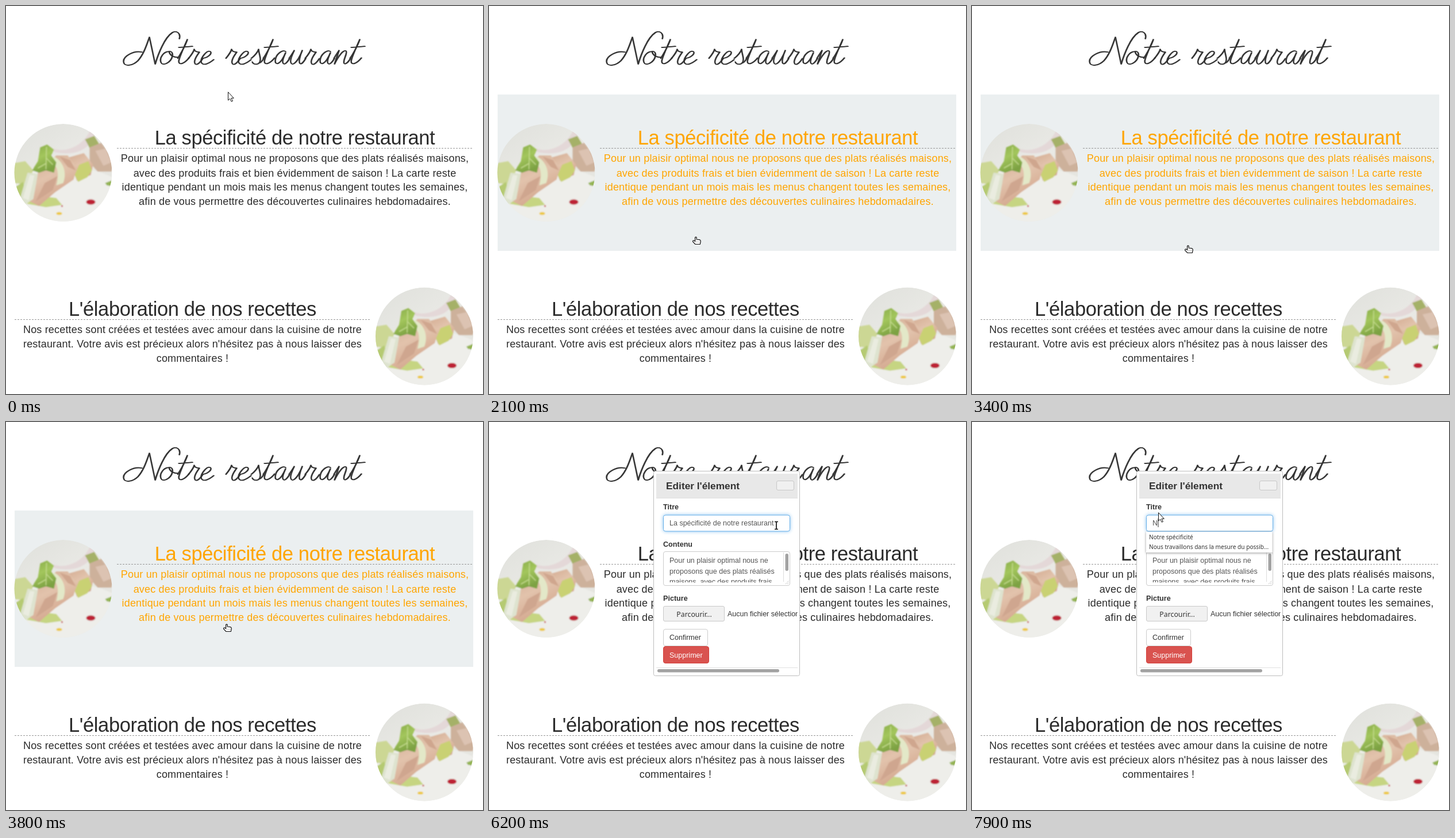
Recreate the animation shown at these times as an HTML page. Size 830 by 675 pixels, loop 8 s.

```html
<!DOCTYPE html>
<html lang="fr">
<head>
<meta charset="utf-8">
<title>Notre restaurant</title>
<style>
html, body { margin: 0; width: 100%; height: 100%; overflow: hidden; background: #fff; }
svg { display: block; width: 830px; height: 675px; }
text { font: 12.5px "Liberation Sans", Arial, sans-serif; fill: #333; white-space: pre; }
.section text { font-size: 18px; letter-spacing: .18px; text-anchor: middle; fill: #2b2b2b; }
.section .head { font-size: 34.5px; letter-spacing: -.38px; }
.section .back { fill: #ebeff0; visibility: hidden; }
.section.on .back { visibility: visible; }
.section.on text { fill: #ffa500; }
.rule { stroke: #999; stroke-dasharray: 3 2; }
.bold { font-weight: bold; font-size: 12.6px; }
.field { fill: #555; }
.ui { font-family: "Noto Sans", "Open Sans", sans-serif; }
.item { font-size: 10.1px; }
#title path { fill: none; stroke: #333; stroke-width: 1.5; stroke-linecap: round; stroke-linejoin: round; }
#focus { filter: drop-shadow(0 0 3px rgba(102,175,233,.75)); }
#popup rect { filter: drop-shadow(0 1px 2px rgba(0,0,0,.4)); }
.white { fill: #fff; }
.edge { fill: #fff; stroke: #ccc; }
</style>
</head>
<body>
<svg viewBox="0 0 830 675">
  <defs>
    <clipPath id="disc"><circle r="85"/></clipPath>
    <clipPath id="area"><rect x="305" y="228" width="208" height="51"/></clipPath>
    <clipPath id="body"><rect x="291" y="90" width="246" height="345"/></clipPath>
    <clipPath id="picked"><rect class="pick" y="167" height="17"/></clipPath>
    <filter id="soft"><feGaussianBlur stdDeviation="1.3"/></filter>
    <linearGradient id="plate" x2=".6" y2="1">
      <stop stop-color="#dfe0db"/><stop offset=".5" stop-color="#e9e9e5"/><stop offset="1" stop-color="#e4e4de"/>
    </linearGradient>
    <linearGradient id="ham" x2=".5" y2="1">
      <stop stop-color="#d3ab92"/><stop offset=".5" stop-color="#e2c3ac"/><stop offset="1" stop-color="#d2a48b"/>
    </linearGradient>
    <linearGradient id="leaf" x2=".4" y2="1">
      <stop stop-color="#86aa48"/><stop offset=".5" stop-color="#a3c65c"/><stop offset="1" stop-color="#7da243"/>
    </linearGradient>
    <g id="dish" clip-path="url(#disc)">
      <circle r="85" fill="url(#plate)"/>
      <g filter="url(#soft)">
        <path d="M-90 8C-50 -20 30 -20 90 10V90H-90Z" fill="#eeeeea"/>
        <path d="M-18 -42C4 -34 34 -46 46 -72L55 -68C48 -40 20 -28 -16 -36Z" fill="#e4d8d8"/>
        <path d="M38 -58L54 -64L66 -44L50 -36Z" fill="#a5b168"/>
        <path d="M46 -44L66 -52L90 -20L84 -2L60 -2L46 -18Z" fill="#cdb19b"/>
        <path d="M56 -38L74 -42L84 -18L70 -12Z" fill="#dcc3b2"/>
        <path d="M-90 -16L-66 -20L-52 -4L-64 20L-90 18Z" fill="#ccd794"/>
        <path d="M-64 54L-44 40L-12 44L-2 56L-30 60Z" fill="#c6d582"/>
        <path d="M-88 28L-70 16L-60 42L-74 52Z" fill="#b5ca72"/>
        <path d="M8 -26L36 -34L52 -14L48 4L24 14Z" fill="url(#ham)"/>
        <path d="M28 -14L44 -20L50 -4L42 8L26 16L20 4Z" fill="#c9d173"/>
        <path d="M-62 48L-44 0L-12 -30L8 -30L24 -8L18 12L-14 34L-42 58Z" fill="url(#ham)"/>
        <path d="M-48 50L-32 18L-10 6L-18 30Z" fill="#cfa68f"/>
        <path d="M-6 -28L12 -22L22 -4L8 -10Z" fill="#cfa68e"/>
        <path d="M-16 -28C-2 -22 8 -2 0 18L-12 22C-6 0 -10 -12 -22 -20Z" fill="#e3e8c8"/>
        <path d="M-54 -4L-44 -20L-40 -44L-28 -49L-16 -40L-21 -30L-12 -18L-16 0L-30 -4L-42 0Z" fill="url(#leaf)"/>
        <path d="M-29 -45L-30 -6M-30 -16L-44 -8M-30 -26L-18 -14" stroke="#c5dc8e" stroke-width="1.5" fill="none"/>
        <path d="M-76 48L-62 0L-44 2L-52 46L-70 57Z" fill="#dee3cf"/>
        <path d="M-70 44L-58 4L-50 5L-60 48Z" fill="#eaece0"/>
        <ellipse cx="48" cy="51" rx="8" ry="4.5" fill="#bd2434"/>
        <ellipse cx="-7" cy="71" rx="5" ry="2.5" fill="#ecc83f"/>
        <circle cx="-2" cy="58" r="1.5" fill="#c23a40"/>
        <path d="M73 18L88 12V24L76 22Z" fill="#94b455"/>
      </g>
    </g>
  </defs>

  <g id="title" role="img" aria-label="Notre restaurant"></g>

  <g class="section" id="first">
    <rect class="back" x="15" y="154" width="798" height="272"/>
    <use href="#dish" x="99.5" y="290"/>
    <text class="head" x="502.5" y="241">La spécificité de notre restaurant</text>
    <path class="rule" d="M193 247.5H813"/>
    <text x="502.5" y="271">Pour un plaisir optimal nous ne proposons que des plats réalisés maisons,</text>
    <text x="502.5" y="297">avec des produits frais et bien évidemment de saison ! La carte reste</text>
    <text x="502.5" y="321">identique pendant un mois mais les menus changent toutes les semaines,</text>
    <text x="502.5" y="346">afin de vous permettre des découvertes culinaires hebdomadaires.</text>
  </g>

  <g class="section" id="second">
    <rect class="back" x="15" y="439" width="798" height="236"/>
    <use href="#dish" x="728" y="574.5"/>
    <text class="head" x="324.5" y="539">L'élaboration de nos recettes</text>
    <path class="rule" d="M15 545.5H635"/>
    <text x="324.5" y="569">Nos recettes sont créées et testées avec amour dans la cuisine de notre</text>
    <text x="324.5" y="594">restaurant. Votre avis est précieux alors n'hésitez pas à nous laisser des</text>
    <text x="324.5" y="619">commentaires !</text>
  </g>

  <g id="modal">
    <rect x="286.5" y="85.5" width="254" height="356" rx="3" fill="#fff" stroke="#bdbdbd"/>
    <rect x="291" y="90" width="246" height="42" fill="#e8e8e8"/>
    <path d="M291 132.5H537M291 427.5H537" stroke="#e0e0e0"/>
    <text class="bold" x="308" y="117" style="font-size:17.3px">Editer l'élement</text>
    <rect x="500.5" y="102.5" width="30" height="16" rx="2.5" fill="#f0f0f0" stroke="#c8c8c8"/>

    <text class="bold" x="303" y="152">Titre</text>
    <rect id="focus" x="303.5" y="162" width="220" height="28" rx="3.5" fill="#fff" stroke="#66afe9"/>
    <text class="field" id="value" x="314" y="180"></text>
    <g id="selection">
      <rect class="pick" y="167" height="17" fill="#3daee9"/>
      <text class="white" x="314" y="180" clip-path="url(#picked)">La spécificité de notre restaurant</text>
    </g>
    <path id="caret" stroke="#333"/>

    <text class="bold" x="303" y="217">Contenu</text>
    <rect class="edge" x="303.5" y="225.5" width="220" height="59" rx="3.5"/>
    <g clip-path="url(#area)">
      <text class="field" x="314" y="245">Pour un plaisir optimal nous ne</text>
      <text class="field" x="314" y="263.5">proposons que des plats réalisés</text>
      <text class="field" x="314" y="282">maisons, avec des produits frais</text>
    </g>
    <path d="M512.5 227V278" stroke="#ddd"/>
    <rect x="515.5" y="229" width="5.5" height="30" rx="2.7" fill="#a3a3a3"/>
    <path d="M516 282L522 276M519 282L522 279" stroke="#aaa" stroke-dasharray="1 1"/>

    <text class="bold" x="303" y="311">Picture</text>
    <rect x="303.5" y="320.5" width="106" height="26" rx="2.5" fill="#f1f1f1" stroke="#c9c9c9"/>
    <text class="ui" x="357" y="339" text-anchor="middle" style="font-size:12.3px">Parcourir...</text>
    <text x="415" y="338" clip-path="url(#body)">Aucun fichier sélectionné.</text>

    <rect class="edge" x="303.5" y="360.5" width="77" height="29" rx="3.5"/>
    <text x="314" y="379">Confirmer</text>
    <rect x="303.5" y="390.5" width="79" height="29" rx="3.5" fill="#d9534f" stroke="#d43f3a"/>
    <text class="white" x="314" y="410">Supprimer</text>
    <rect x="293" y="430" width="212" height="5.5" rx="2.7" fill="#a3a3a3"/>

    <g id="popup">
      <rect x="303" y="191" width="219.5" height="36" fill="#fff"/>
      <text class="ui item" x="308" y="204">Notre spécificité</text>
      <text class="ui item" x="308" y="221">Nous travaillons dans la mesure du possib...</text>
    </g>
  </g>

  <g id="cursor" stroke="#111" fill="#fff">
    <path id="arrow" d="M.5 .7V15L3.7 12.2L6.2 17.3L8.4 16.3L6 11.3H10.3Z"/>
    <g id="hand">
      <path d="M2.6 6.5V1.6Q3.9 .2 5.2 1.6V5L10.5 5.7Q12.4 6.2 12.3 8.6L11.3 13.5H2.8L-1.3 9Q-1.8 6.6 .6 7L2.6 8.3Z" stroke-width="1.2"/>
      <path d="M4.5 9.5H10.5" stroke="#777" stroke-dasharray="1 1.5"/>
    </g>
    <g id="beam" fill="none">
      <path d="M-3 -6.5H3M0 -6.5V6.5M-3 6.5H3" stroke="#fff" stroke-width="3.4"/>
      <path d="M-3 -6.5H3M0 -6.5V6.5M-3 6.5H3" stroke-width="1.7"/>
    </g>
  </g>
</svg>
<script>
const $ = id => document.getElementById(id);
const show = (id, on) => $(id).style.visibility = on ? 'visible' : 'hidden';

// Script lettering: pen strokes on a baseline at y = 0, doubled for a broad nib
const glyphs = {
  N: 'M33 -21C19 -24 0 -14 1 -4C2 5 17 3 26 -6C36 -17 41 -33 46 -47L56 0C61 -17 72 -46 86 -55C93 -59 101 -54 98 -44',
  o: 'M14 -22C4 -22 -3 -10 0 -3C3 4 17 -2 20 -14C21 -20 18 -23 14 -22C16 -14 22 -12 29 -12',
  t: 'M0 -10C6 -18 14 -34 17 -43C11 -29 3 -13 2 -5C2 3 12 -1 20 -11M2 -29L26 -31',
  r: 'M0 -10C5 -16 9 -22 10 -26C11 -21 17 -21 19 -21C13 -13 8 -4 12 0C16 2 21 -4 25 -10',
  e: 'M0 -10C10 -11 18 -19 14 -22C8 -25 -3 -11 -2 -4C0 5 13 -2 20 -8',
  s: 'M0 -10C6 -14 12 -22 13 -26C13 -18 19 -8 14 -2C10 2 3 0 2 -4M14 -2C18 -3 20 -7 22 -10',
  a: 'M20 -22C14 -26 3 -17 2 -7C1 3 11 2 20 -20C16 -11 13 -4 16 -1C19 2 24 -5 27 -10',
  u: 'M0 -10C4 -16 7 -20 9 -24C5 -16 0 -5 4 -1C9 3 18 -10 23 -24C19 -15 16 -4 19 -1C22 1 26 -5 29 -10',
  n: 'M0 -10C4 -17 8 -22 9 -24L1 0C7 -13 16 -25 21 -23C25 -20 14 -5 18 -1C21 1 26 -5 29 -10'
};
const advance = { N: 66, o: 29, t: 19, r: 24, e: 20, s: 21, a: 26, u: 28, n: 28 };
function write(word, x) {
  for (const c of word) {
    for (const nib of [0, 1.2])
      $('title').innerHTML += `<path d="${glyphs[c]}" transform="translate(${x + nib} ${101 + nib / 4})"/>`;
    x += advance[c];
  }
}
write('Notre', 203);
write('restaurant', 382);

// Pointer track: time, x, y
const track = [
  [0, 386, 149], [500, 386, 149], [2100, 356, 401], [2300, 357, 452], [2500, 364, 480],
  [3000, 364, 480], [3800, 380, 351], [5100, 380, 351], [5500, 308, 232], [5900, 485, 191],
  [6200, 500, 180], [6300, 500, 180], [6900, 320, 158], [7000, 320, 158], [7200, 324, 157],
  [8000, 324, 157]
];
function pointer(t) {
  const i = track.findIndex(k => k[0] > t);
  const [t0, x0, y0] = track[i - 1], [t1, x1, y1] = track[i];
  const f = (t - t0) / (t1 - t0);
  return [x0 + (x1 - x0) * f, y0 + (y1 - y0) * f];
}
const inside = (x, y, l, t, r, b) => x >= l && x <= r && y >= t && y <= b;

function draw(t) {
  const [x, y] = pointer(t);
  const open = t >= 4200, typed = t >= 7800;

  const hover1 = !open && y >= 154 && y < 426, hover2 = !open && y >= 439;
  $('first').classList.toggle('on', hover1);
  $('second').classList.toggle('on', hover2);

  $('modal').style.display = open ? '' : 'none';
  $('modal').style.opacity = Math.min(1, (t - 4100) / 300);
  $('value').textContent = typed ? 'N' : 'La spécificité de notre restaurant';
  show('caret', typed || t >= 5100 && t < 5700);
  $('caret').setAttribute('d', `M${typed ? 324 : 314.5} 168V183`);
  show('popup', t >= 7900);

  const from = t >= 6900 ? 314 : Math.min(495, Math.max(314, x));
  show('selection', t >= 6400 && !typed);
  for (const r of document.querySelectorAll('.pick')) {
    r.setAttribute('x', from);
    r.setAttribute('width', 495 - from);
  }

  const beam = open && (inside(x, y, 304, 162, 524, 190) || inside(x, y, 304, 226, 513, 284));
  const hand = hover1 || hover2;
  show('beam', beam);
  show('hand', hand);
  show('arrow', !beam && !hand);
  $('cursor').setAttribute('transform', `translate(${Math.round(x)} ${Math.round(y)})`);
}

const start = performance.now();
function tick() {
  const t = (performance.now() - start) % 8000;
  draw(Math.floor(t / 100) * 100);
  requestAnimationFrame(tick);
}
tick();
</script>
</body>
</html>
```
